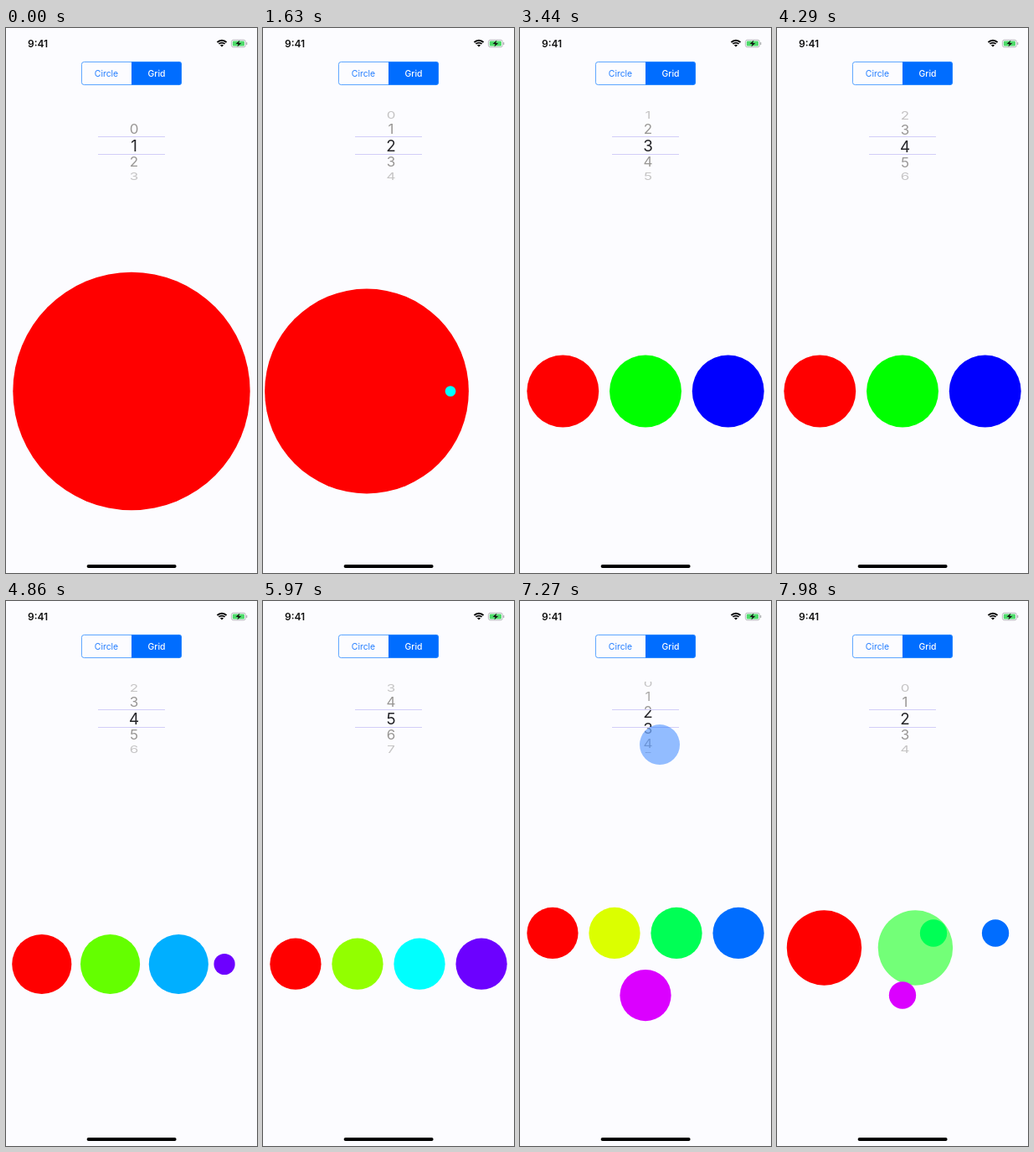
Animation, 300 px wide and 649 px high, one loop 8000 ms. Source, as an HTML page with a canvas:

```html
<!DOCTYPE html>
<html lang="en">
<head>
<meta charset="utf-8">
<title>Circle grid picker</title>
<style>
  html, body { margin: 0; width: 100%; height: 100%; overflow: hidden; background: #fcfcff; }
  canvas { display: block; width: 300px; height: 649px; }
</style>
</head>
<body>
<canvas id="stage"></canvas>
<script>
const W = 300, H = 649, LOOP = 8000;
const FONT = 'Inter, Roboto, "Liberation Sans", sans-serif';
const BLUE = '#006dff';

const canvas = document.getElementById('stage');
const ctx = canvas.getContext('2d');
const dpr = window.devicePixelRatio || 1;
canvas.width = W * dpr;
canvas.height = H * dpr;

// Finger drags on the wheel; `apply` is when the grid starts to follow.
const DRAGS = [
  { down: 210,  start: 560,  up: 900,  end: 1340, apply: 1425, from: 1, to: 2, y: 165 },
  { down: 1960, start: 2080, up: 2400, end: 2660, apply: 2740, from: 2, to: 3, y: 165 },
  { down: 3600, start: 3750, up: 4150, end: 4480, apply: 4555, from: 3, to: 4, y: 165 },
  { down: 5080, start: 5250, up: 5560, end: 5860, apply: 5940, from: 4, to: 5, y: 165 },
  { down: 6490, start: 6640, up: 7330, end: 7650, apply: 7739, from: 5, to: 2, y: 119 }
];
const MORPH = 500, SIZE_LAG = 27, FADE = 120;

const clamp = v => Math.min(1, Math.max(0, v));
const mix = (a, b, p) => a + (b - a) * p;

// Timing curve with control points (x1, 0) and (x2, 1).
function curve(x1, x2) {
  return t => {
    t = clamp(t);
    let lo = 0, hi = 1;
    for (let i = 0; i < 24; i++) {
      const s = (lo + hi) / 2, r = 1 - s;
      if (3 * s * r * r * x1 + 3 * s * s * r * x2 + s * s * s < t) lo = s;
      else hi = s;
    }
    return lo * lo * (3 - 2 * lo);
  };
}
const easeInOut = curve(0.42, 0.58);
const easeDrag = curve(0.35, 0.3);

function roundRect(x, y, w, h, r) {
  ctx.beginPath();
  ctx.roundRect(x, y, w, h, r);
}

function disc(x, y, r, color) {
  if (r <= 0) return;
  ctx.fillStyle = color;
  ctx.beginPath();
  ctx.arc(x, y, r, 0, Math.PI * 2);
  ctx.fill();
}

function label(text, x, y, size, weight, color, align = 'center') {
  ctx.font = `${weight} ${size}px ${FONT}`;
  ctx.textAlign = align;
  ctx.fillStyle = color;
  ctx.fillText(text, x, y + size * 0.364);
}

function drawStatusBar() {
  label('9:41', 26, 18.3, 12, 600, '#111', 'left');

  ctx.save();
  ctx.beginPath();
  ctx.moveTo(258, 22.6);
  ctx.lineTo(249.5, 14);
  ctx.lineTo(249.5, 10);
  ctx.lineTo(266.5, 10);
  ctx.lineTo(266.5, 14);
  ctx.clip();
  ctx.strokeStyle = '#000';
  ctx.lineWidth = 1.9;
  for (const r of [7.7, 4.8]) {
    ctx.beginPath();
    ctx.arc(258, 22.4, r, 0, Math.PI * 2);
    ctx.stroke();
  }
  disc(258, 22.4, 2.7, '#000');
  ctx.restore();

  roundRect(269.4, 14.2, 17, 8.6, 2.4);
  ctx.strokeStyle = '#a9a9ad';
  ctx.lineWidth = 0.8;
  ctx.stroke();
  roundRect(270.8, 15.6, 14.2, 5.8, 1.2);
  ctx.fillStyle = '#4fdb6b';
  ctx.fill();
  roundRect(287.2, 17, 1.1, 3, 0.6);
  ctx.fillStyle = '#a9a9ad';
  ctx.fill();

  ctx.beginPath();
  [[279.4, 14.4], [274.6, 19], [277.6, 19], [276.4, 22.6], [281.2, 17.9], [278.2, 17.9]]
    .forEach(([x, y]) => ctx.lineTo(x, y));
  ctx.closePath();
  ctx.fillStyle = '#111';
  ctx.fill();
}

function drawSegments() {
  ctx.fillStyle = BLUE;
  roundRect(150, 40, 60, 28, [0, 3.4, 3.4, 0]);
  ctx.fill();
  roundRect(90.4, 40.4, 119.2, 27.2, 3);
  ctx.strokeStyle = '#2d8cff';
  ctx.lineWidth = 0.8;
  ctx.stroke();
  label('Circle', 120, 54, 10.4, 400, '#267fff');
  label('Grid', 180, 54, 10.4, 500, '#fff');
}

function drawDigits(pos, size, color, top, bottom) {
  const step = 0.386, radius = 52;
  ctx.save();
  ctx.beginPath();
  ctx.rect(110, top, 80, bottom - top);
  ctx.clip();
  for (let n = 0; n <= 9; n++) {
    const a = (n - pos) * step;
    if (Math.abs(a) > 1.2) continue;
    ctx.save();
    ctx.translate(153, 140 + radius * Math.sin(a));
    ctx.scale(1, Math.cos(a));
    ctx.globalAlpha = 1 - 0.45 * clamp(Math.abs(a) / step - 1);
    label(String(n), 0, 0, size, 400, color);
    ctx.restore();
  }
  ctx.restore();
}

function drawWheel(pos) {
  drawDigits(pos, 17, '#989694', 96, 129.5);
  drawDigits(pos, 18.8, '#242428', 129.5, 150.5);
  drawDigits(pos, 17, '#989694', 150.5, 181);
  ctx.fillStyle = '#d2cef8';
  ctx.fillRect(110, 129, 80, 1);
  ctx.fillRect(110, 150, 80, 1);
}

// Hue wheel shared out over n items, on a coarse display palette.
function shade(i, n) {
  const h = i / n * 5.999;
  const ramp = [Math.abs(h - 3) - 1, 2 - Math.abs(h - 2), 2 - Math.abs(h - 4)];
  return ramp.map((v, k) => {
    const levels = k < 2 ? 7 : 3;
    return Math.round(clamp(v) * levels) / levels * 255;
  });
}

function cell(i, n) {
  const gap = 12.8, perRow = Math.min(n, 4);
  const size = (283.4 - gap * (perRow - 1)) / perRow;
  const rows = Math.ceil(n / perRow), row = Math.floor(i / perRow);
  const inRow = Math.min(perRow, n - row * perRow);
  const pitch = size + gap;
  return {
    x: 150 + (i % perRow - (inRow - 1) / 2) * pitch,
    y: 432.5 + (row - (rows - 1) / 2) * pitch,
    r: size / 2,
    rgb: shade(i, n)
  };
}

function drawGrid(from, to, since) {
  const p = easeInOut(since / MORPH);
  const q = easeInOut((since - SIZE_LAG) / MORPH);
  for (let i = 0; i < Math.max(from, to); i++) {
    const a = cell(i, i < from ? from : to);
    const b = cell(i, i < to ? to : from);
    let r = mix(a.r, b.r, q);
    if (i >= from) r *= p * q;
    if (i >= to) r *= 1 - p;
    const rgb = a.rgb.map((v, k) => Math.round(mix(v, b.rgb[k], p)));
    disc(mix(a.x, b.x, p), mix(a.y, b.y, p), r, `rgb(${rgb})`);
  }
}

function drawTouch(t, drag, pos) {
  const alpha = Math.min(clamp((t - drag.down) / FADE), clamp((drag.up + FADE - t) / FADE));
  if (alpha <= 0) return;
  ctx.globalAlpha = alpha * 0.46;
  disc(167, drag.y - (pos - drag.from) * 20, 24, '#1470ff');
  ctx.globalAlpha = 1;
}

function render(t) {
  ctx.setTransform(dpr, 0, 0, dpr, 0, 0);
  ctx.fillStyle = '#fcfcff';
  ctx.fillRect(0, 0, W, H);

  const drag = DRAGS.filter(d => t >= d.down).pop() || DRAGS[0];
  const pos = mix(drag.from, drag.to, easeDrag((t - drag.start) / (drag.end - drag.start)));
  const morph = DRAGS.filter(d => t >= d.apply).pop() || DRAGS[0];

  drawStatusBar();
  drawSegments();
  drawWheel(pos);
  drawGrid(morph.from, morph.to, t - morph.apply);
  drawTouch(t, drag, pos);

  roundRect(96.6, 639, 107, 4, 2);
  ctx.fillStyle = '#000';
  ctx.fill();
}

const began = performance.now();
function tick() {
  render((performance.now() - began) % LOOP);
  requestAnimationFrame(tick);
}
tick();
</script>
</body>
</html>
```
